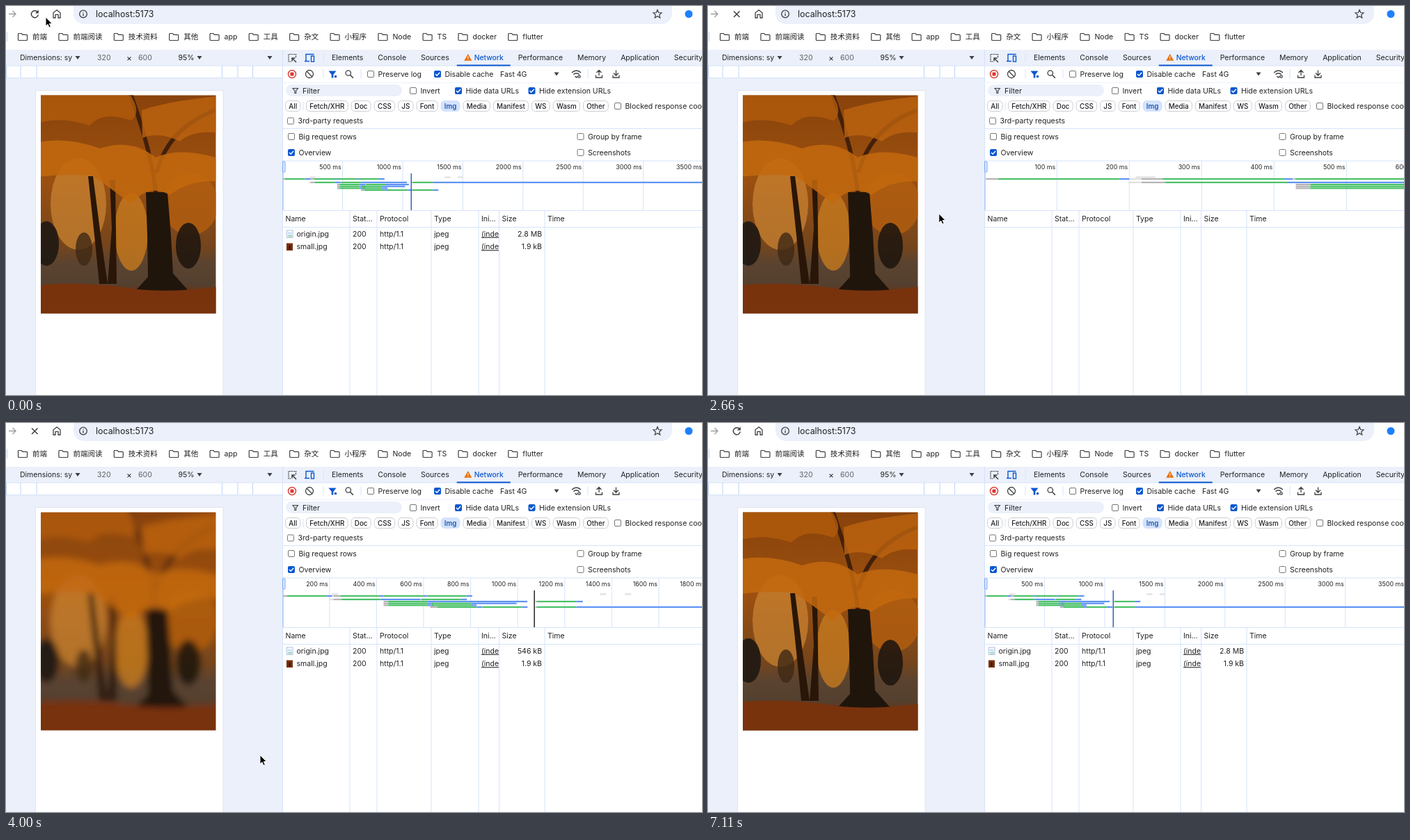
Write an HTML page that moves like this. It is 1000 by 560 pixels and loops after 7860 ms.

```html
<!DOCTYPE html>
<html lang="zh">
<head>
<meta charset="utf-8">
<title>Network panel</title>
<style>
html, body { margin: 0; width: 100%; height: 100%; overflow: hidden; background: #fff; }
svg { display: block; width: 1000px; height: 560px; }
text { font-family: Inter, "Noto Sans CJK SC", "Noto Sans CJK", sans-serif; white-space: pre; }
</style>
</head>
<body>
<svg id="stage" viewBox="0 0 1000 560" xmlns="http://www.w3.org/2000/svg"></svg>
<script>
const INK = '#202124', ICON = '#3c4043', BLUE = '#0b57d0', PALE = '#ebf0fa', LINE = '#d5e3fb';

// ---- drawing helpers ----
const text = (x, y, s, { size = 10.5, fill = INK, anchor = 'start', weight = 400, more = '' } = {}) =>
  `<text x="${x}" y="${y + size * .36}" font-size="${size}" fill="${fill}" text-anchor="${anchor}" font-weight="${weight}" ${more}>${s}</text>`;
const rect = (x, y, w, h, fill, more = '') =>
  `<rect x="${x}" y="${y}" width="${w}" height="${h}" fill="${fill}" ${more}/>`;
const path = (d, stroke = ICON, width = 1.3, fill = 'none') =>
  `<path d="${d}" stroke="${stroke}" stroke-width="${width}" fill="${fill}"/>`;
const shape = (d, fill, more = '') => `<path d="${d}" fill="${fill}" ${more}/>`;
const circle = (x, y, r, stroke = ICON, width = 1.3, fill = 'none') =>
  `<circle cx="${x}" cy="${y}" r="${r}" stroke="${stroke}" stroke-width="${width}" fill="${fill}"/>`;
const blob = (x, y, rx, ry, fill, opacity = 1) =>
  `<ellipse cx="${x}" cy="${y}" rx="${rx}" ry="${ry}" fill="${fill}" opacity="${opacity}"/>`;
const vline = (x, y1, y2, color = LINE) => path(`M${x} ${y1}V${y2}`, color, 1);
const hline = (y, x1, x2, color = LINE) => path(`M${x1} ${y}H${x2}`, color, 1);
const caret = (x, y) => shape(`M${x - 3.5} ${y - 2.5}h7l-3.5 5z`, ICON);
const check = (x, y, label, on) =>
  (on ? rect(x - 5, y - 5, 10, 10, BLUE, 'rx="2"') + path(`M${x - 3} ${y}l2.2 2.3 4-4.6`, '#fff', 1.4)
      : rect(x - 4.5, y - 4.5, 9, 9, '#fff', 'rx="1.5" stroke="#747775"')) + text(x + 10.5, y, label);
const folder = (x, y) =>
  path(`M${x + .5} ${y - 4.5}h4.8l1.6 1.8h5.6a1 1 0 0 1 1 1v6.2a1 1 0 0 1-1 1h-11a1 1 0 0 1-1-1v-8a1 1 0 0 1 1-1z`, ICON, 1.2);
const star = (cx, cy, r) => 'M' + Array.from({ length: 10 }, (_, i) => {
  const a = i * Math.PI / 5 - Math.PI / 2, k = i % 2 ? r * .45 : r;
  return `${(cx + k * Math.cos(a)).toFixed(2)} ${(cy + k * Math.sin(a)).toFixed(2)}`;
}).join('L') + 'Z';

const ruler = document.createElement('canvas').getContext('2d');
const widthOf = (s, size = 10.5, weight = 400) => {
  ruler.font = `${weight} ${size}px Inter, "Noto Sans CJK SC", "Noto Sans CJK", sans-serif`;
  return ruler.measureText(s).width;
};

// Lays labels out from left to right; item(label, x, width) draws one and returns it with its full advance.
function flow(x, labels, item) {
  return labels.split(' ').map(s => {
    const [markup, advance] = item(s, x);
    x += advance;
    return markup;
  }).join('');
}

// ---- static interface ----
function browser() {
  return rect(97, -14, 860, 40, PALE, 'rx="15"')
    + path('M4 11.5H13.5M9.5 7l4.5 4.5-4.5 4.5', '#9a9da1')
    + path('M68 17V9.8L73 5.8 78 9.8V17H75V12.3H71V17Z')
    + circle(111, 11.5, 5.3) + path('M111 10.7V14.4M111 8.4V9.6')
    + text(129, 11.5, 'localhost:5173', { size: 12.4 })
    + path(star(936, 11.8, 6.3), ICON, 1.2)
    + circle(981, 11.5, 5.5, 'none', 0, '#1e80ff')
    + vline(1.5, 37, 51, '#c5d8f7')
    + flow(17, '前端 前端阅读 技术资料 其他 app 工具 杂文 小程序 Node TS docker flutter',
      (s, x) => [folder(x, 44) + text(x + 21, 44, s), widthOf(s) + 37.4]);
}

function deviceBar() {
  const grey = { fill: '#5f6368' };
  return rect(0, 63, 397, 497, PALE) + rect(0, 86, 397, 17.5, '#fff') + hline(86, 0, 397) + hline(103.5, 0, 397)
    + [.5, 21, 44, 310.5, 333, 354.5].map(x => vline(x, 86, 103, '#bcd3f8')).join('')
    + text(20, 74.5, 'Dimensions: sy') + caret(103, 74.5)
    + text(131, 74.5, '320', grey) + text(173, 74.5, '×', { size: 12 }) + text(190, 74.5, '600', grey)
    + text(247.5, 74.5, '95%') + caret(278, 74.5) + caret(379, 74.5)
    + rect(42.5, 121.5, 269.5, 450, '#fff', 'stroke="#dfe4ee"');
}

function toolbar() {
  const tray = (x, d) => path(`M${x - 4.5} 99.5v3.5h9v-3.5M${x} 92.5v7.5${d}`);
  const tab = (s, x) => {
    if (s !== 'Network') return [text(x, 74.5, s), widthOf(s) + 21];
    const mark = shape(`M${x + 6} 69l5.5 9.7h-11z`, '#e8710a') + path(`M${x + 6} 72.5v3m0 .9v1`, '#fff', 1.1);
    const w = widthOf(s, 10.3, 500) + 15;
    return [mark + text(x + 15, 74.5, s, { fill: BLUE, weight: 500, size: 10.3 }) + rect(x - 10, 84.5, w + 20, 2, BLUE), w + 21];
  };
  return rect(397, 63, 603, 497, '#fff') + rect(397, 63, 603, 23, PALE) + vline(397.5, 63, 560)
    + hline(86, 397, 1000) + hline(110.5, 397, 1000, '#edf2fb')
    + path('M416.5 74V69.5H406V80H410', ICON, 1.2).replace('/>', ' stroke-dasharray="2 1"/>')
    + path('M417 81l-5.5-5.5M411 79.5V75H415.5', ICON, 1.5)
    + path('M431 79.5V69.5H442.5M429 79.5h7', BLUE, 1.4) + rect(438.5, 72, 4, 8, 'none', `stroke="${BLUE}" stroke-width="1.4"`)
    + vline(456, 68, 81)
    + flow(468, 'Elements Console Sources Network Performance Memory Application Security', tab)
    + circle(411, 98, 5.5, '#dc362e', 1.4) + rect(408.5, 95.5, 5, 5, '#dc362e')
    + circle(436, 98, 5.5) + path('M432 94l8 8') + vline(456, 91, 104)
    + shape('M463.5 93.5h11l-4.2 5.2v4.8h-2.6v-4.8z', BLUE) + circle(473.5, 101.5, 1.8, 'none', 0, BLUE)
    + circle(491.8, 96.5, 3.7) + path('M494.5 99.3l4.3 4.3', ICON, 1.5) + vline(510, 91, 104)
    + check(524, 98, 'Preserve log') + check(620, 98, 'Disable cache', true)
    + text(710, 98, 'Fast 4G') + caret(791, 98)
    + path('M813 96Q819.5 90 826 96M815.3 98.6Q819.5 94.8 823.7 98.6M817.5 101l2 2 1.5-1.5')
    + circle(823.5, 101.5, 1.7) + vline(836, 91, 104)
    + tray(852, 'm-3.5-4l3.5-3.5 3.5 3.5') + tray(876.5, 'm-3.5-3.5l3.5 3.5 3.5-3.5');
}

function filters() {
  const chip = (s, x) => {
    const on = s === 'Img', w = widthOf(s, 9.8, 500) + 10.5;
    return [rect(x + .5, 136.5, w - 1, 15, on ? '#d3e3fd' : '#fff', `rx="5" stroke="${on ? '#d3e3fd' : '#c9cdd3'}"`)
      + text(x + w / 2, 144, s, { size: 9.8, anchor: 'middle', weight: 500, fill: on ? '#0842a0' : INK }), w + 4];
  };
  return rect(402, 113, 167, 17, PALE, 'rx="8.5"') + path('M412 118.5h7.5l-2.8 3.5v3.5h-1.9v-3.5z', ICON, 1.1)
    + text(426, 122, 'Filter')
    + check(585, 122, 'Invert') + check(650, 122, 'Hide data URLs', true) + check(755.5, 122, 'Hide extension URLs', true)
    + flow(401, 'All', chip) + vline(427, 138, 150)
    + flow(431, 'Fetch/XHR Doc CSS JS Font Img Media Manifest WS Wasm Other', chip)
    + check(879, 144, 'Blocked response cookies') + check(409, 165.5, '3rd-party requests') + hline(176.5, 397, 1000)
    + check(410, 188, 'Big request rows') + check(825.5, 188, 'Group by frame')
    + check(410, 211, 'Overview', true) + check(825.5, 211, 'Screenshots') + hline(223, 397, 1000);
}

const COLUMNS = { Name: 397.5, 'Stat…': 494, Protocol: 533, Type: 611, 'Ini…': 679, Size: 708.5, Time: 774 };
const table = () => hline(294.5, 397, 1000) + hline(318.5, 397, 1000)
  + Object.entries(COLUMNS).map(([s, x]) => vline(x, 295, 560) + text(x + 4, 306.5, s)).join('');

function photo() {
  return rect(20, 98, 312, 374, 'url(#wood)')
    + blob(104, 285, 40, 66, '#c98230', .75) + blob(180, 325, 24, 56, '#c67a1f', .8) + blob(265, 285, 40, 45, '#ae5c10', .9)
    + blob(58, 342, 18, 32, '#1f1812', .9) + blob(262, 345, 18, 33, '#21170f', .9) + blob(112, 350, 12, 24, '#3f2814', .8)
    + path('M217 290C214 235 200 185 176 118M216 240C230 190 262 165 300 150', '#42200a', 6)
    + shape('M118 245h7L136 330 146 400H134L127 330ZM149 250h8L159 400H146L152 320Z', '#291608')
    + shape('M201 268H232L237 330 240 385 264 412 222 416 184 412 204 390 203 330Z', '#20150b')
    + shape('M30 110H165Q200 150 180 165 140 150 120 172 70 155 30 175Z', '#b25c0c', 'opacity=".8"')
    + shape('M195 150Q240 135 322 128V185Q270 175 250 195 220 180 196 190Z', '#bd6310', 'opacity=".8"')
    + shape('M30 200Q80 185 135 205 180 190 215 218 255 200 322 225V255Q270 245 235 272 205 255 180 285 150 262 125 245 90 240 30 248Z', '#c4690f', 'opacity=".85"')
    + shape('M20 404Q110 394 190 408 250 414 332 400V472H20Z', '#78330d');
}

// ---- network timeline, in ms ----
const LATENCY = 168, GREY = '#b4b4b4', LIGHT = '#e0e0e0', GREEN = '#49c167', SKY = '#5d92f2';
const rowY = row => row ? 246.6 + [0, 2.4, 7.4, 10.4, 13.1, 15.8, 18.4][row] : 246.5;

// Each connection carries its downloads one after another.
function pageLoad(start, batch, second, third, bigRow) {
  const calls = [];
  const chain = (row, queued, wait, downloads) => {
    for (const load of downloads) {
      const sent = queued + wait, end = sent + LATENCY + load;
      calls.push({ row, queued, sent, end });
      queued = end + 1;
      wait = 3;
    }
  };
  chain(1, 2, 17, [13]);
  chain(1, start, 29, [12, 13, 13]);
  chain(2, start, 33, second);
  chain(3, batch, 20, third);
  chain(4, batch, 20, [13, 192]);
  chain(5, batch, 20, [12, 18]);
  chain(6, batch + 198, 30, [20, 19]);
  chain(bigRow, 1076, 6, [8000]);
  chain(bigRow === 6 ? 3 : 6, 1076, 6, [27]);
  return { start, calls };
}
const before = pageLoad(236, 455, [45, 381], [46, 190], 2);
const after = pageLoad(217, 430, [169, 25], [423], 6);

function overview({ start, calls }, msPerPx, markColor) {
  const at = ms => 397.2 + ms / msPerPx;
  const bar = (row, x1, x2, fill) => x1 > 1000 ? '' : rect(x1, rowY(row) - 1.1, Math.min(x2, 1010) - x1, 2.2, fill);
  const step = [20, 50, 100, 200, 500].find(s => s / msPerPx >= 64);
  const edge = 602 * msPerPx;
  let out = '';
  for (let ms = step; at(ms) < 1060; ms += step) {
    const x = at(ms);
    out += vline(x, 223, 294) + text(x - 2, 232, ms + ' ms', { size: 8.9, anchor: 'end' });
  }
  for (const ms of [start - 8, 1350, 1456]) out += bar(0, at(ms), Math.max(at(ms + 27), at(ms) + 8), LIGHT);
  for (const row of [1, 2]) out += bar(row, at(start - 18), at(start), LIGHT);
  for (const { row, queued, sent, end } of calls) {
    if (queued + 40 > edge) continue;
    const got = at(sent + LATENCY);
    out += bar(row, at(queued), at(sent), GREY) + bar(row, at(sent), got, GREEN) + bar(row, got, Math.max(at(end), got + 8), SKY);
  }
  return out + path(`M${at(1071)} 241V294`, markColor, 1.5)
    + path('M398 223V294', '#8fb4f3', 1) + rect(397.5, 224, 3.5, 15, '#dce9fe', 'stroke="#7ba7f0" rx="1"');
}

function row(y, name, size, pending, thumb) {
  const icon = thumb
    ? rect(403, y - 5, 9, 10.5, '#7a2f0c') + rect(406.5, y - 2, 2, 6, '#24150b')
    : rect(403.5, y - 5, 8.5, 10.5, '#fff', 'stroke="#a9bfe2"') + rect(405, y - 2.5, 5.5, 3, '#c9dcfb')
      + rect(405, y + 1.5, 6, 3, pending ? '#58b072' : '#a9d8c0');
  return icon + text(417.5, y, name)
    + (pending ? text(498, y, '(pe…', { fill: '#80868b' }) : text(498, y, '200') + text(537, y, 'http/1.1') + text(615, y, 'jpeg'))
    + `<g clip-path="url(#init)">${text(683, y, '(index)', { more: 'text-decoration="underline"' })}</g>`
    + text(770, y, pending ? '0 B' : size, { anchor: 'end' });
}

const LOOP = 7860, REFRESH = 148, LEAD = 12;
const HOVER = 4, PRESS = 12, LEAVE = 14, CLEAR = 15, BLANK = 20, LISTED = 21, LOADED = 23, SHARPER = 29, SHARP = 32, GONE = 42, DONE = 44;
const pointer = [[0, 57, 16], [3, 38, 12], [13, 38, 12], [17, 323, 255], [21, 358, 431], [24, 365, 478], [38, 365, 478], [41, 364, 538]];
const msPerPx = [[15, .406], [17, .776], [21, 1.517], [27, 2.959], [34, 4.625], [39, 5.787]];

function along(keys, n) {
  const i = keys.findIndex(k => k[0] > n);
  if (i < 1) return keys.at(i).slice(1);
  const a = keys[i - 1], b = keys[i], p = (n - a[0]) / (b[0] - a[0]);
  return a.slice(1).map((v, j) => v + (b[j + 1] - v) * p);
}

function received(n) {
  const mb = Math.min(2.8, Math.max(.02, .546 + (n - 27) * .145));
  return mb < 1 ? Math.round(mb * 1000) + ' kB' : mb.toFixed(1) + ' MB';
}

const stage = document.getElementById('stage');
stage.innerHTML = `<defs>
  <linearGradient id="wood" x1="0" y1="0" x2="0" y2="1">
    <stop offset="0" stop-color="#843f0a"/><stop offset=".4" stop-color="#9c500f"/><stop offset=".66" stop-color="#75451c"/>
    <stop offset=".73" stop-color="#5a4330"/><stop offset=".81" stop-color="#54402f"/><stop offset=".85" stop-color="#6e300e"/>
  </linearGradient>
  <clipPath id="print">${rect(50, 128.5, 251.5, 314, '#000')}</clipPath>
  <clipPath id="init">${rect(679, 318, 29, 40, '#000')}</clipPath>
  <filter id="soft" filterUnits="userSpaceOnUse" x="10" y="88" width="332" height="394"><feGaussianBlur stdDeviation="5"/></filter>
</defs>`
  + rect(0, 0, 1000, 560, '#fff') + browser() + deviceBar()
  + `<g clip-path="url(#print)"><g id="photo">${photo()}</g></g>`
  + toolbar() + filters() + table()
  + '<g id="net"></g><g id="reload"></g><g id="tip">'
  + rect(38.5, 30.5, 180, 15.5, '#e9e8e8', 'stroke="#d0d0d0" stroke-width=".8"')
  + text(44, 38, '重新加载此网页，按下可查看更多选项', { size: 9.95, fill: '#333' }) + '</g><g id="cursor">'
  + path('M0 0V13L3 10.3 5 15 7.3 14 5.3 9.5H9.3Z', '#fff', 1, '#000') + '</g>';

const [photoEl, net, reload, tip, cursor] = ['photo', 'net', 'reload', 'tip', 'cursor'].map(id => document.getElementById(id));
const blurEl = stage.querySelector('feGaussianBlur');
const show = (el, on) => el.setAttribute('display', on ? 'inline' : 'none');

function draw(n) {
  const within = (a, b) => n >= a && n < b;
  const fresh = n >= CLEAR, pending = within(LISTED, LOADED);

  net.innerHTML = overview(fresh ? after : before, fresh ? along(msPerPx, n)[0] : 5.787, within(CLEAR, SHARPER) ? '#222' : '#2f62b8')
    + (within(CLEAR, LISTED) ? '' : row(328, 'origin.jpg', fresh ? received(n) : '2.8 MB', pending)
      + row(346.5, 'small.jpg', '1.9 kB', pending, !pending));

  show(photoEl, !within(BLANK, LOADED));
  blurEl.setAttribute('stdDeviation', n < SHARPER ? 5 : 2);
  photoEl.setAttribute('filter', within(LOADED, SHARP) ? 'url(#soft)' : 'none');

  reload.innerHTML = (within(PRESS, LEAVE) ? circle(41, 11.5, 13.5, 'none', 0, '#eeeff1') : '')
    + (within(LEAVE, DONE) ? path('M37 7.5l8.5 8.5m0-8.5l-8.5 8.5', ICON, 1.5)
      : path('M45.3 8.6A5 5 0 1 0 46.3 12.5', ICON, 1.5) + shape('M46.8 5.5v5h-5z', ICON));

  show(tip, within(HOVER, PRESS + 1));
  show(cursor, n < GONE);
  cursor.setAttribute('transform', `translate(${along(pointer, n)})`);
}

let shown = -1;
function frame() {
  const n = Math.floor((performance.now() % LOOP + LEAD) / REFRESH);
  if (n !== shown) draw(shown = n);
  requestAnimationFrame(frame);
}
frame();
</script>
</body>
</html>
```
